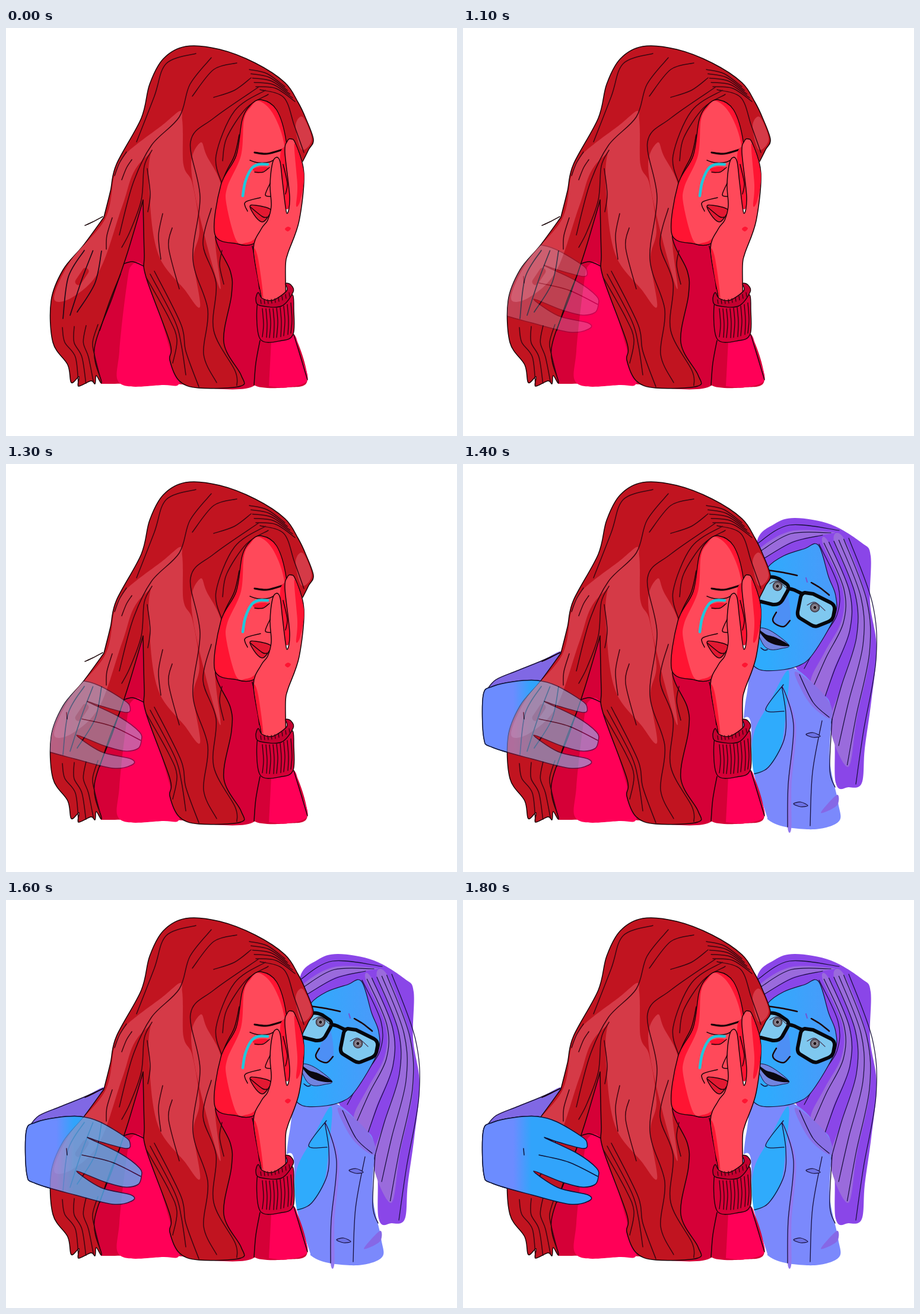
Write an HTML page that moves like this. It is 760x688 px and loops after 6.8 s.

```html
<!DOCTYPE html>
<html lang="en">
<head>
<meta charset="utf-8">
<title>Comfort</title>
<style>
html, body { margin: 0; width: 100%; height: 100%; overflow: hidden; background: #fff; }
svg { display: block; width: 100%; height: 100%; }
</style>
</head>
<body>
<svg viewBox="0 0 760 688" fill="none" stroke-linecap="round" stroke-linejoin="round">
  <defs>
    <clipPath id="inside"></clipPath>
    <linearGradient id="arm" gradientUnits="userSpaceOnUse" x1="85" x2="115">
      <stop stop-color="#6c8cff"/><stop offset="1" stop-color="#31a4fb"/>
    </linearGradient>
    <linearGradient id="cheek" gradientUnits="userSpaceOnUse" x1="510" x2="615">
      <stop stop-color="#2eabfd"/><stop offset="1" stop-color="#489bfa"/>
    </linearGradient>
  </defs>
  <g id="friend"></g>
  <g id="woman"></g>
  <g id="hand"></g>
</svg>
<script>
const NS = 'http://www.w3.org/2000/svg';
const $ = id => document.getElementById(id);
const LOOP = 6800, START = 1000, STEP = 100, STEPS = 9;
const INK = '#1a0408', NAVY = '#17103a';

const parse = text => text.split(' ').map(s => s.split(',').map(Number));
const mix = (a, b, t) => a + (b - a) * t;

// Smooth curve through a list of points.
function curve(p, closed) {
  const n = p.length;
  const at = i => closed ? p[(i + n) % n] : p[Math.max(0, Math.min(n - 1, i))];
  let d = 'M' + p[0];
  for (let i = 0; i < (closed ? n : n - 1); i++) {
    const [a, b, c, e] = [at(i - 1), at(i), at(i + 1), at(i + 2)];
    const c1 = b.map((v, k) => (v + (c[k] - a[k]) / 6).toFixed(1));
    const c2 = c.map((v, k) => (v - (e[k] - b[k]) / 6).toFixed(1));
    d += `C${c1} ${c2} ${c}`;
  }
  return d + (closed ? 'Z' : '');
}

function add(parent, tag, attrs) {
  const el = document.createElementNS(NS, tag);
  for (const k in attrs) el.setAttribute(k, attrs[k]);
  return parent.appendChild(el);
}

// Curve between two guides; t = 0 follows a, t = 1 follows b.
function between(a, b, t) {
  const q = parse(b);
  return parse(a).map(([x, y], i) => [mix(x, q[i][0], t), mix(y, q[i][1], t)]);
}

function pen(g) {
  const path = (p, closed, fill, stroke, width) =>
    add(g, 'path', { d: curve(p, closed), fill, stroke, 'stroke-width': width });
  return {
    blob: (pts, fill, stroke = 'none', width = 1.4) => path(parse(pts), true, fill, stroke, width),
    // the closing edge of an open shape has no outline
    open: (pts, fill, stroke = 'none', width = 1.5) => path(parse(pts), false, fill, stroke, width),
    line: (pts, stroke = INK, width = 1.5) => path(parse(pts), false, 'none', stroke, width),
    strands(a, b, n, stroke, width = 1.5) {
      for (let i = 0; i < n; i++) path(between(a, b, i / (n - 1)), false, 'none', stroke, width);
    },
    band: (a, b, from, to, fill) =>
      path([...between(a, b, from), ...between(a, b, to).reverse()], true, fill, 'none', 0)
  };
}

function drawHand(g) {
  const { blob, line } = pen(g);
  const pts = '34,390 50,375 85,367 125,365 158,374 200,399 209,410 203,419 160,408 138,401 192,427 225,452 228,467 222,480 200,484 165,475 119,457 160,485 210,497 213,507 180,513 115,497 50,478 35,462';
  blob(pts, 'url(#arm)');
  const haze = blob(pts, '#fff');
  blob(pts, 'none', '#0c1238', 1.5);
  line('128,430 178,442 227,466', '#0c1238');
  line('102,419 103,430', '#0c1238');
  return haze;
}

function drawFriend(g) {
  const { blob, open, line, strands, band } = pen(g);
  open('38,384 55,364 90,349 130,333 166,316 150,350 128,372 80,372', '#8068e4');
  line('38,384 55,364 90,349 130,333 164,318', NAVY);
  drawHand(g).setAttribute('opacity', 0);

  // long hair, its bands and strands spread between an inner and an outer guide
  blob('495,132 525,101 560,91 620,102 672,133 687,155 686,235 697,310 688,400 677,480 672,538 650,545 628,537 621,430 565,350 500,220', '#8a46e8');
  const inner = '600,135 632,205 630,255 600,300 575,345', outer = '650,125 690,235 696,330 675,450 662,540';
  const low = '495,135 550,103 634,112', high = '506,160 555,132 606,120';
  band(inner, outer, .12, .32, '#9a6bdc');
  band(inner, outer, .5, .85, '#9a6bdc');
  band(low, high, .35, .95, '#9a6bdc');
  strands(inner, outer, 7, NAVY, 1.2);
  strands(low, high, 3, NAVY, 1.2);

  // neck and jacket
  open('472,440 478,390 495,330 560,345 600,383 620,410 618,500 632,570 632,604 580,616 511,597 488,520', '#7b89fc');
  blob('548,348 515,405 490,455 487,521 515,510 535,480 544,420', '#2fabfc');
  blob('560,350 598,378 620,408 619,430 590,410 570,380', '#8970e6');
  band('538,376 557,440 548,540 547,612', '548,395 563,445 556,540 556,614', 0, .7, '#9278ee');
  blob('630,558 603,588 630,576', '#8668e6');
  line('489,523 515,511 541,465 544,420 538,376 557,440 548,540 547,612', NAVY, 1.3);
  line('567,355 590,402 617,427', NAVY, 1.3);
  line('605,433 589,520 585,610', NAVY, 1.3);
  line('540,372 510,414 541,417', NAVY, 1.3);
  line('622,430 618,515 627,545', NAVY, 1.3);
  for (const [x, y] of [[590, 457], [569, 574]])
    blob(`${x - 12},${y - 1} ${x},${y - 4} ${x + 12},${y + 2} ${x},${y + 4}`, '#6d72e6', NAVY, 1.2);

  // face
  blob('599,137 616,190 628,222 626,258 590,320 566,340 530,348 498,346 485,325 495,270 503,205 514,174 540,155 575,143', 'url(#cheek)', NAVY, 1.2);
  blob('545,218 525,258 527,270 551,266', '#4d8ff5');
  line('514,179 540,183 563,188', INK, 2.6);
  line('587,200 602,209 617,221', INK, 2.6);
  line('578,192 580,199', '#7254d2', 2);

  // glasses
  const lens = { fill: '#7fc8ef', stroke: '#06060c', 'stroke-width': 6 };
  add(g, 'path', { ...lens, d: 'M498 204L513 192Q521 188 533 194L546 203Q550 207 547 214L538 230Q533 238 522 237L502 232' });
  add(g, 'path', { ...lens, d: 'M576 217L590 219L620 234Q627 238 626 246L624 257Q622 264 613 267L598 273Q592 275 586 271L568 260Q563 257 564 249L569 224Q571 218 576 217Z' });
  line('548,210 557,212 572,219', '#06060c', 6);
  for (const [cx, cy] of [[530, 206], [593, 242]]) {
    add(g, 'circle', { cx, cy, r: 7.5, fill: '#77727f', stroke: '#39313d', 'stroke-width': 1.5 });
    add(g, 'circle', { cx, cy, r: 3.4, fill: '#20151c', stroke: '#c9c5cc' });
    line(`${cx - 13},${cy - 4} ${cx},${cy - 9} ${cx + 17},${cy + 5}`, '#46324a', 1.2);
  }
  line('528,250 522,262 527,270 541,274 551,264', INK, 2.4);
  blob('497,278 518,281 549,305 537,311 518,313 505,303', '#7184e0', NAVY, 1);
  blob('496,277 510,287 528,293 550,306 532,306 512,298', '#0b0710');
  line('502,310 508,314 513,313', NAVY);
  // pale rim between the two figures
  line('474,430 483,437 487,516 511,597', '#fff', 4);
}

function drawWoman(g) {
  const { blob, open, line, strands } = pen(g);
  const dark = '#c11420', glow = '#d53a47', skin = '#ff495a', red = '#ff1432', wool = '#d50037', pink = '#ff0057', hair = '#3c0610';

  // sweater
  const body = open('160,600 148,545 185,430 198,395 231,270 352,320 428,345 432,530 420,602 330,607 285,600 165,600', wool);
  blob('193,600 191,545 204,430 212,400 231,401 255,470 277,545 292,598 265,602', pink);
  line('195,399 213,394 233,402');
  open('427,527 455,529 484,516 508,593 475,606 418,602 421,565', wool);
  open('447,528 484,516 495,550 508,593 475,606 443,604', pink);
  line('428,527 421,565 418,602');
  line('485,517 495,550 508,593');
  line('415,368 421,395 427,440');

  // hair
  const crown = open('500,225 510,205 518,188 505,152 492,125 470,92 420,59 360,36 303,31 265,52 242,95 228,152 186,230 176,275 165,319', dark, INK);
  const lock = open('165,319 130,367 96,408 76,460 79,530 104,568 110,598 123,588 122,604 143,595 150,600 152,586 161,597 149,540 180,452 205,378 231,290', dark, INK);
  const mane = open('231,290 233,380 236,420 276,530 276,560 292,595 325,607 395,604 396,585 367,530 380,450 378,410 352,348 364,262 385,215 393,180', dark, INK);
  [ '295,140 262,165 202,212 183,248 167,322 108,394 81,456 112,454 158,408 196,300 222,232 285,178',
    '293,145 245,208 243,300 258,385 300,440 327,470 316,390 326,340 314,262 299,230',
    '328,193 312,230 327,320 361,440 352,348 363,270 338,215',
    '488,165 498,205 515,188 500,150'
  ].forEach(s => blob(s, glow));
  line('134,410 122,428', dark, 11);

  strands('410,70 440,77 470,99', '421,99 455,102 487,124', 5, hair);
  strands('437,105 385,140 354,215 364,263', '442,112 405,135 372,185 365,224', 2, hair);
  strands('203,209 191,228 183,249', '212,222 203,236 195,256', 2, hair);
  strands('264,313 257,350 261,390', '280,337 274,370 292,440', 2, hair);
  strands('236,420 274,488 288,525 281,565', '250,410 295,500 303,545 325,605', 3, hair);
  strands('95,505 99,530 117,555 122,602', '155,500 146,530 150,555 160,594', 4, hair);
  strands('132,375 105,420 96,490', '161,376 150,430 120,479', 3, '#210817', 1.7);
  [ '320,43 270,60 250,115 220,192', '346,50 310,95 292,150 245,198 214,262 191,349',
    '389,59 350,70 314,115', '413,84 385,105 350,117',
    '425,100 350,152 311,192 327,285 315,390 340,475 333,550 355,598',
    '428,104 468,117 486,165 502,210', '246,206 233,233 228,290 209,343 195,370',
    '238,237 243,280 239,310', '179,320 170,350 169,373',
    '346,304 332,365 354,430 350,510 386,578 389,603', '364,375 360,400 367,432'
  ].forEach(s => line(s, hair));
  line('193,415 175,460 158,510');
  line('133,333 146,327 163,318');

  // face
  blob('430,121 456,138 472,190 475,260 455,310 427,338 423,358 410,366 390,364 352,348 362,265 388,215 398,155 412,130', red, INK);
  blob('426,123 449,143 468,192 472,260 440,326 422,353 405,362 388,358 372,300 373,268 396,215 401,155 412,134', skin);
  line('419,210 440,212 466,205', INK, 3.2);
  blob('416,238 430,234 442,236 425,245', red);
  line('411,223 424,227 444,226 457,218');
  line('419,243 433,243 444,235');
  line('441,230 425,230 413,238 403,260 399,283', '#20c8dc', 4.5);
  line('446,260 437,281 446,284');
  line('429,286 403,294 407,309');
  blob('411,301 421,299 446,306 441,319 432,327 421,319', '#e31932', INK);
  line('412,302 432,318 440,319');

  // raised hand
  blob('462,220 470,200 480,210 480,290 470,300', red);
  open('433,472 428,440 417,372 430,339 441,324 447,300 445,265 449,228 456,218 462,226 466,260 473,312 478,285 470,210 474,191 480,187 488,195 502,245 494,325 475,380 471,402 472,465', skin, INK);
  blob('486,195 502,245 496,290 489,300 491,265', red);
  blob('418,374 424,385 431,430 433,456 425,425', red);
  blob('470,339 475,335 480,338 475,343', red);
  line('467,230 474,262 471,280');

  // ribbed cuff
  blob('425,460 450,469 470,464 483,450 485,475 484,516 465,527 428,524', wool, INK);
  blob('421,458 425,446 432,456 450,459 473,443 471,431 480,433 484,445 464,469 428,468', '#c40030', INK);
  for (let i = 0; i < 9; i++) {
    const x = 432 + i * 6, dip = 4 * Math.sin(i / 8 * Math.PI);
    line(`${x},${473 - i * 1.2 + dip} ${x + 2},${500 - i} ${x + i % 2},${521 - i * .8 + dip}`, INK, 1.2);
    line(`${x - 3},${458 - i * 1.5 + dip} ${x - 2},${465 - i * 1.5 + dip}`, INK, 1.1);
  }
  [body, crown, lock, mane].forEach(p => add($('inside'), 'path', { d: p.getAttribute('d') }));
}

drawFriend($('friend'));
drawWoman($('woman'));
const haze = drawHand($('hand'));

function render(time) {
  const t = time % LOOP;
  const step = t < START ? 0 : Math.min(STEPS, Math.floor((t - START) / STEP) + 1);
  const alpha = step / STEPS;
  const solid = alpha > .5; // areas off the woman switch on at half strength
  $('friend').setAttribute('visibility', solid ? 'visible' : 'hidden');
  $('hand').setAttribute('opacity', alpha);
  $('hand').setAttribute('clip-path', solid ? 'none' : 'url(#inside)');
  // the haze is only for the part in front of her
  haze.setAttribute('opacity', .8 * (1 - alpha));
  haze.setAttribute('clip-path', 'url(#inside)');
}

const begin = performance.now();
function tick() {
  render(performance.now() - begin);
  requestAnimationFrame(tick);
}
render(0);
requestAnimationFrame(tick);
</script>
</body>
</html>
```
